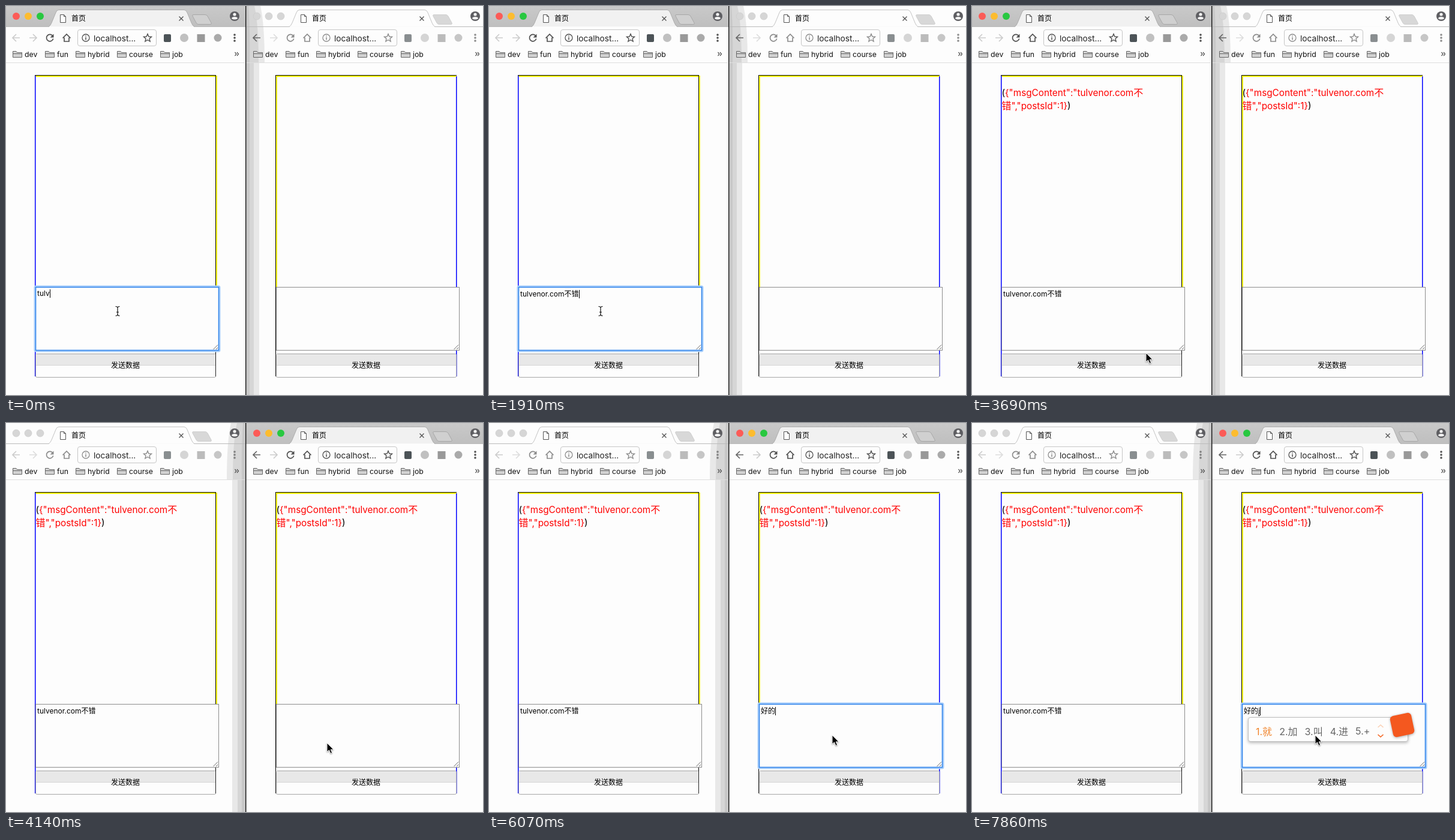
Recreate the animation shown at these times as an HTML page. Size 795 by 648 pixels, loop 8000 ms.

```html
<!DOCTYPE html>
<html lang="zh-CN">
<head>
<meta charset="utf-8">
<title>首页</title>
<style>
html, body { margin: 0; width: 100%; height: 100%; overflow: hidden; background: #fdfdfd; }
body, svg text { font-family: Inter, "Noto Sans CJK SC", "Noto Sans CJK", sans-serif; }
body > svg { position: absolute; left: 0; top: 0; }
.bar { fill: #fdfdfd; }
.on .bar { fill: url(#bar); }
.tab { fill: #fdfdfd; stroke: #c4c4c4; }
.on .tab { fill: #f1f1f1; stroke: #adadad; }
.plus { fill: #d8d8d8; stroke: #cfcfcf; }
.on .plus { fill: #d0d0d0; stroke: #a8a8a8; }
.lights { fill: #d6d6d6; stroke: #c8c8c8; stroke-width: .6; }
.on .lights { stroke: none; }
.on .lights :nth-child(1) { fill: #fc5b57; }
.on .lights :nth-child(2) { fill: #fdbc2e; }
.on .lights :nth-child(3) { fill: #28c840; }
.on .shade { display: none; }
.tools { opacity: .65; }
.on .tools { opacity: 1; }
.line { fill: none; stroke: #505050; stroke-width: 1.7; }
.mark { font-size: 12.3px; fill: #111; }
.field { position: absolute; font-size: 12px; line-height: 16px; white-space: pre; color: #000; }
.bad { text-decoration: underline dotted #f33 2px; text-underline-offset: 2px; }
.comp { box-shadow: 0 1px #000; display: inline-block; height: 15px; }
.caret { display: inline-block; width: 1px; height: 14px; margin-right: -1px; vertical-align: -3px; background: #000; }
#pop { position: absolute; box-sizing: border-box; height: 41px; padding: 4px 39px 0 12px; display: flex; gap: 12px;
  align-items: center; font-size: 16px; white-space: pre; color: #666; background: #fdfdfd;
  border: 1px solid #c0c0c0; border-radius: 4px; box-shadow: 0 2px 5px #0004; }
#pop span:first-child { color: #f08228; }
#pop .badge { position: absolute; right: -9px; top: -6px; width: 36px; height: 36px; border-radius: 6px;
  background: #f4581f; transform: rotate(-12deg); box-shadow: 0 1px 4px #0005; }
#pop svg { display: block; }
#pop span svg { display: inline-block; vertical-align: -3px; margin-left: 2px; }
</style>
</head>
<body>
<svg id="stage" width="795" height="648"></svg>
<div class="field" style="left:52px"></div>
<div class="field" style="left:453px"></div>
<div id="pop"></div>
<svg id="mouse" width="795" height="648">
  <path id="beam" d="M-3.5-7.5Q0-7.5 0-5Q0-7.5 3.5-7.5M0-5V6M-2 2H2M-3.5 8Q0 8 0 5.500Q0 8 3.500 8" fill="none" stroke="#111" stroke-width="1.2"/>
  <path id="arrow" d="M0 0V15L3.500 11.800L6 17.500L8.600 16.400L6.200 11H11Z" stroke="#fff" style="filter:drop-shadow(0 1px 1px #0006)"/>
</svg>
<script>
const $ = id => document.getElementById(id);
const SITE = 'tulvenor.com';

const folder = (x, name) => `
  <path d="M${x + .5} 85.500V75.500H${x + 6}L${x + 7.500} 77.500H${x + 15.500}V85.500ZM${x + .5} 79.500H${x + 15.500}"
    fill="#d2d2d2" stroke="#666"/>
  <text class="mark" x="${x + 20}" y="85">${name}</text>`;

const rect = (x, y, w, h, fill) => `<rect x="${x}" y="${y}" width="${w}" height="${h}" fill="${fill}"/>`;

function shade(right) {
  return `<g class="shade" ${right ? 'transform="translate(-401)"' : 'transform="translate(799) scale(-1 1)"'}>
    <path fill="#e8e8e8" d="M400 0H424Q431 30 431 94H422V648H400Z"/>
    <path fill="#d6d6d6" d="M400 0H414Q421 30 421 94H413V648H400Z"/>
    <path fill="#c8c8c8" d="M400 0H404Q407 40 406 94V648H400Z"/></g>`;
}

function frame(right) {
  const top = rect(48, 115, 302, 1, '#000') + rect(49, 116, 301, 2, '#ff0');
  const sides = right
    ? rect(48, 115, 1, 502, '#000') + rect(49, 116, 2, 352, '#ff0') + rect(349, 117, 1.5, 500, '#00f')
    : rect(48, 116, 1.500, 501, '#00f') + rect(350, 116, 2, 352, '#ff0') + rect(349, 116, 1, 501, '#000');
  return top + sides;
}

const message = `<g class="msg" font-size="15.3" fill="#f00">
  <text x="49.500" y="150"><tspan fill="#000">(</tspan>{"msgContent":"${SITE}<tspan font-size="16">不</tspan></text>
  <text x="49.500" y="172"><tspan font-size="16">错</tspan>","postsId":1}<tspan fill="#000">)</tspan></text></g>`;

const back = 'M23 53H11.500M17 47L11 53L17 59';

const win = right => `<g class="win" transform="translate(${right ? 401 : 0})">
  <rect class="bar" x="-1" width="400" height="34"/>
  ${shade(right)}
  <path d="M-1 34.500H399" stroke="#bbb"/>
  <path class="tab" d="M71 34.500Q74 33 76 28L83 11Q84.500 6.500 88 6.500H297Q300 6.500 302 11L309 28Q311 33 314 34.500"/>
  <path d="M72 34.500H313" stroke="#fafafa"/>
  <path class="plus" d="M312 14.500H332Q334.500 14.500 336 17L342 28Q343 30.500 341 30.500H321Q318 30.500 317 28L311 17Q310 14.500 312 14.500Z"/>
  <g class="lights"><circle cx="17" cy="17" r="6"/><circle cx="37" cy="17" r="6"/><circle cx="57" cy="17" r="6"/></g>
  <path d="M90.500 14.500H96.500L99.500 17.500V27.500H90.500ZM96.500 14.500V17.500H99.500" fill="#fff" stroke="#555"/>
  <text x="109" y="25" font-size="12" font-weight="500">首页</text>
  <path d="M288.500 17.500L295.500 24.500M295.500 17.500L288.500 24.500" stroke="#555" stroke-width="1.400"/>
  <circle cx="381" cy="17" r="8" fill="#5e5e62"/>
  <circle cx="381" cy="14" r="2.600" fill="#f4f4f4"/><path d="M376 21Q376 18 381 18T386 21Q381 24 376 21Z" fill="#f4f4f4"/>
  <path class="line" d="${back}" style="stroke:${right ? '#666' : '#ccc'}"/>
  <g class="tools">
    <path class="line" d="${back}" transform="translate(62) scale(-1 1)" style="stroke:#ccc"/>
    <path class="line" d="M78 50A5.700 5.700 0 1 0 78.700 54.500"/><path d="M79.500 46.500V52.500H73.500Z" fill="#505050"/>
    <path class="line" d="M94.500 53.500L101 47L107.500 53.500M97 52.500V59H105V52.500"/>
    <circle class="line" cx="133" cy="53" r="6" style="stroke-width:1.300"/>
    <path class="line" d="M133 52V56.500M133 49.300V50.800" style="stroke-width:1.500"/>
    <path class="line" style="stroke-width:1.400" d="M236 46.500L237.900 51L242.500 51.300L239 54.400L240.100 59L236 56.500L231.900 59L233 54.400L229.500 51.300L234.100 51Z"/>
    <rect x="263" y="47" width="12" height="13" rx="2" fill="#4c5357"/>
    <circle cx="297" cy="53" r="7" fill="#c0c0c0"/>
    <rect x="318.500" y="47" width="13" height="13" fill="#999"/>
    <circle cx="353" cy="53" r="6.500" fill="#aaa"/>
    <g fill="#505050"><circle cx="381" cy="48" r="1.800"/><circle cx="381" cy="53" r="1.800"/><circle cx="381" cy="58" r="1.800"/></g>
  </g>
  <rect x="119.500" y="39.500" width="131" height="27" rx="3.500" fill="none" stroke="#c6c6c6"/>
  <text x="146" y="58.500" font-size="13.700" fill="#222">localhost...</text>
  ${folder(11, 'dev')}${folder(65, 'fun')}${folder(116, 'hybrid')}${folder(185, 'course')}${folder(257, 'job')}
  <path class="line" style="stroke-width:1.200" d="M381.500 77L384 80L381.500 83M385 77L387.500 80L385 83"/>
  <path d="M-1 94.500H398" stroke="#dedede"/>
  ${frame(right)}${message}
  <rect x="49.500" y="468.500" width="305" height="105" fill="#fdfdfd" stroke="#8c8c8c"/>
  <g class="ring" fill="none"><rect x="48" y="467" width="308" height="108" rx="2" stroke="#a9cffb" stroke-width="3"/>
    <rect x="49.500" y="468.500" width="305" height="105" stroke="#3485ea" stroke-width="1.600"/></g>
  <path d="M345.500 572L353 564.500M350 572L353 569" stroke="#666"/>
  <rect x="49.500" y="579.500" width="300" height="39" rx="2" fill="#fdfdfd" stroke="#a6a6a6"/>
  ${rect(50, 580, 299, 18, '#e8e8e8')}${rect(50, 598, 299, 1, '#d4d4d4')}
  ${rect(right ? 48 : 349, 580, 1, 37, '#222')}
  <text x="199" y="603" font-size="12" font-weight="500" text-anchor="middle">发送数据</text>
</g>`;

$('stage').innerHTML = `<defs><linearGradient id="bar" x2="0" y2="1">
  <stop stop-color="#c9c9c9"/><stop offset="1" stop-color="#bfbfbf"/></linearGradient></defs>
  ${rect(0, 0, 795, 648, '#fdfdfd')}${win(false)}${win(true)}
  ${rect(399, 0, 1, 648, '#111')}${rect(400, 0, .6, 648, '#555')}`;

const hand = `<svg width="18" height="18" fill="#fcc02e"><circle cx="6" cy="10" r="3.500" fill="none" stroke="#fcc02e" stroke-width="2.600"/>
  <path d="M7 6L9 1.500M10 8L13 2M11 11L16.500 4.500M9 13L12 13" stroke="#fcc02e" stroke-width="2.800" stroke-linecap="round"/>
  <ellipse cx="10" cy="14" rx="4" ry="3.500"/></svg>`;

// Each step changes only the listed parts; the rest carries over.
// left, right: [text, text being composed]; pop: [x, y, candidates]
const bu = list => [109, 489, list], hao = list => [435, 489, list];
const goodDay = ['好的 好多 好大 好到 好点', '好的 号的 好得 毫的 耗的'];
const steps = [
  [0, { active: 0, focus: 0, msg: 0, caret: 1, left: ['tulv', ''], right: ['', ''], pop: null, mouse: [186, 508], beam: 1 }]
];
[5, 6, 7, 8, 9, 10, 12].forEach((n, i) =>
  steps.push([Math.round(150 + i * 146.700), { left: [SITE.slice(0, n), ''] }]));
steps.push(
  [1470, { left: [SITE, 'bu'], pop: bu('不 补 部 布 步') }],
  [1620, { left: [SITE, 'buc'], pop: bu('不错 不从 补充 不曾 不存') }],
  [1760, { left: [SITE, 'bucuo'], pop: bu('不错 不错的 不错哦 不错吧 不错啊') }],
  [1910, { left: [SITE + '不错', ''], pop: null }],
  [2210, { mouse: [187, 520] }],
  [2360, { mouse: [188, 546], caret: 0 }],
  [2500, { mouse: [190, 578], beam: 0 }],
  [2650, { mouse: [191, 594] }],
  [2800, { mouse: [191, 598], caret: 1 }],
  [3250, { msg: 1, focus: -1 }],
  [3550, { mouse: [290, 578] }],
  [3700, { mouse: [465, 546] }],
  [3840, { mouse: [535, 533] }],
  [4140, { active: 1 }],
  [4290, { mouse: [553, 527] }],
  [4440, { mouse: [572, 520] }],
  [4730, { focus: 1 }],
  [5180, { caret: 0 }]
);
const typing = [
  { caret: 1, right: ['', 'h'], pop: hao(`好 ${hand.replace(/\s/g, '\u0001')} 和 还 \\(^o^)/~`) },
  { right: ['', 'hao'], pop: hao('好 号 浩 豪 耗') },
  { right: ['', 'haod'], pop: hao(goodDay[0]) },
  { right: ['', 'haode'], pop: hao(goodDay[1]) },
  { right: ['好的', ''], pop: null }
];
[5480, 5630, 5780, 5920, 6070].forEach((t, i) => steps.push([t, typing[i]]));
steps.push([6370, { right: ['好', ''] }], [6510, { right: ['', ''] }]);
[6810, 7260, 7410, 7560, 7710].forEach((t, i) => steps.push([t, typing[i]]));
steps.push([7860, { right: ['好的', 'j'], pop: [460, 490, '就 加 叫 进 +'] }]);

const wins = [...document.querySelectorAll('.win')];
const fields = [...document.querySelectorAll('.field')];
const show = (el, on) => { el.style.display = on ? '' : 'none'; };

function drawField(i, [text, comp], s) {
  const bad = i === 0 && comp ? 'bad' : '';
  fields[i].style.top = (/[\u4e00-\u9fff]/.test(text) ? 472 : 471) + 'px';
  fields[i].innerHTML = `<span class="${bad}">${text}</span>` +
    (comp ? `<span class="comp">${comp}</span>` : '') +
    (s.focus === i && s.caret ? '<i class="caret"></i>' : '');
}

function drawPop(pop) {
  show($('pop'), pop);
  if (!pop) return;
  const [x, y, list] = pop;
  $('pop').style.left = x + 'px';
  $('pop').style.top = y + 'px';
  $('pop').innerHTML = list.split(' ')
    .map((c, i) => `<span>${i + 1}.${c.replace(/\u0001/g, ' ')}</span>`).join('') +
    `<svg width="12" height="28" fill="none" stroke-width="1.600"><path d="M1.500 8L6 4L10.500 8" stroke="#fbd0b4"/>
     <path d="M1.500 20L6 24L10.500 20" stroke="#f4641f"/></svg><i class="badge"></i>`;
}

function draw(s) {
  wins.forEach((w, i) => {
    w.classList.toggle('on', s.active === i);
    show(w.querySelector('.msg'), s.msg);
    show(w.querySelector('.ring'), s.focus === i);
  });
  drawField(0, s.left, s);
  drawField(1, s.right, s);
  drawPop(s.pop);
  show($('beam'), s.beam);
  show($('arrow'), !s.beam);
  $(s.beam ? 'beam' : 'arrow').setAttribute('transform', `translate(${s.mouse})`);
}

let last = 0;
function tick() {
  const t = performance.now() % 8000;
  const past = steps.filter(([at]) => at <= t);
  if (past.length !== last) {
    last = past.length;
    draw(Object.assign({}, ...past.map(p => p[1])));
  }
  requestAnimationFrame(tick);
}
tick();
</script>
</body>
</html>
```
